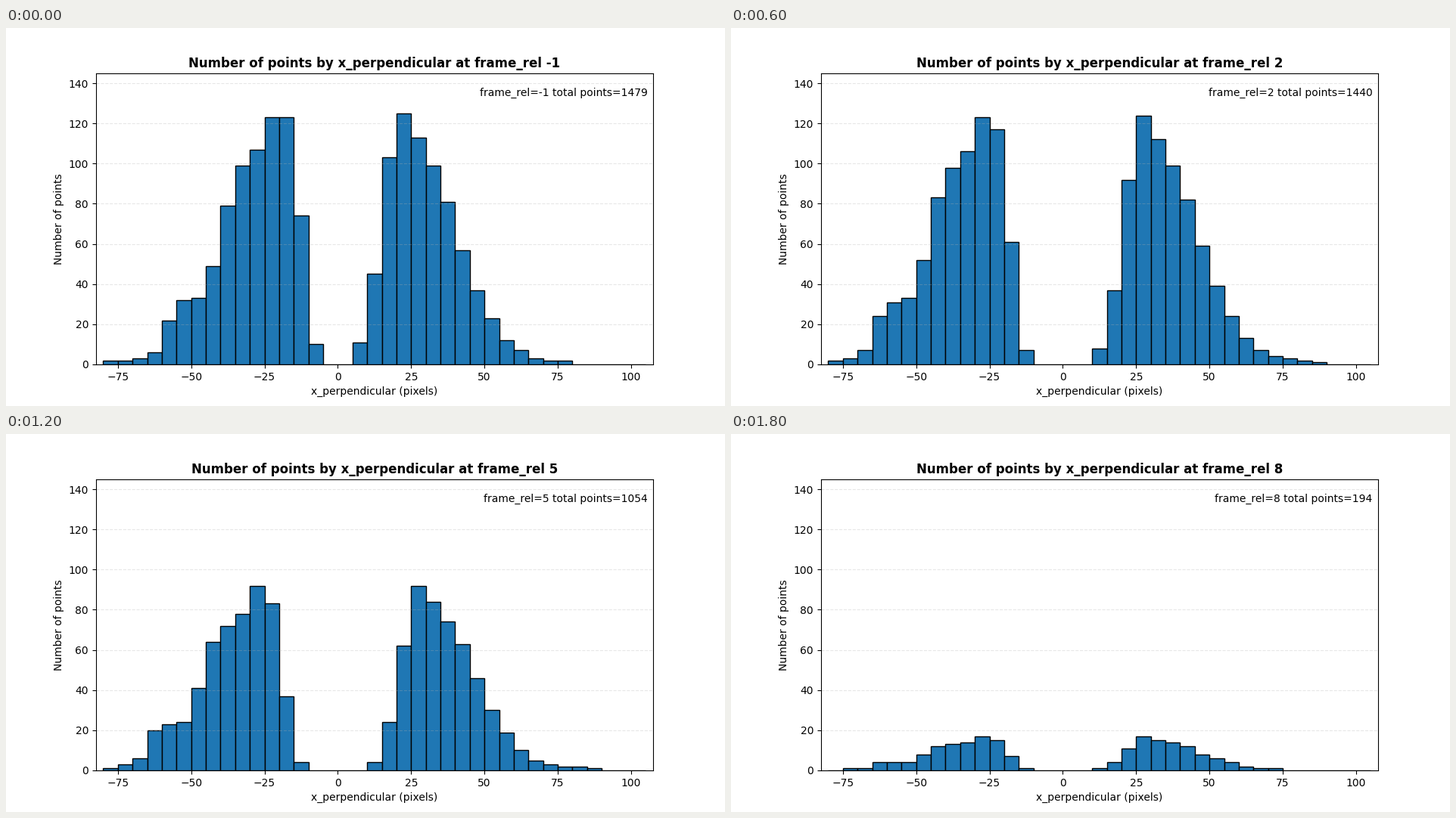
A matplotlib script for the animation above (2 s loop, 950x500 px).

```python
import matplotlib.pyplot as plt
import numpy as np
from matplotlib.animation import FuncAnimation

BIN = 5
EDGES = np.arange(-80, 105, BIN)
STEPS = range(-1, 9)

# Density per thousand points on each side, by distance from the gap's edge.
OFFSET = [-8, -4, 0, 4, 8, 13, 23, 28, 33, 43, 49, 56, 70]
LEFT = [0, 8, 47, 80, 90, 75, 64, 42, 23, 21, 5, 1.5, 1]
RIGHT = [0, 9, 28, 60, 88, 81, 62, 46, 30, 10, 5, 2, 1]

plt.rcParams["font.family"] = "DejaVu Sans"


def total_points(rel):
    """Nearly steady at first, then a steep decline."""
    return round(np.interp(rel, [-1, 0, 2, 4, 6, 7, 8],
                           [1479, 1491, 1440, 1322, 786, 462, 194]))


def gap_edge(rel):
    """The empty middle widens and settles."""
    return 18.8 - 3.3 * np.exp(-0.7 * rel)


def histogram(rel):
    center = EDGES + BIN / 2
    offset = abs(center) - gap_edge(rel)
    density = np.where(center < 0,
                       np.interp(offset, OFFSET, LEFT, right=0),
                       np.interp(offset, OFFSET, RIGHT, right=0))
    return np.round(density * total_points(rel) / 1000)


fig, ax = plt.subplots(figsize=(9.5, 5), dpi=100)
bars = ax.bar(EDGES, histogram(STEPS[0]), width=BIN, align="edge",
              color="#1f77b4", edgecolor="black")
ax.set_xlim(-82.5, 107.5)
ax.set_ylim(0, 144.9)
ax.set_xlabel("x_perpendicular (pixels)")
ax.set_ylabel("Number of points")
ax.grid(axis="y", linestyle="--", alpha=0.3)
title = ax.set_title("", fontweight="bold")
note = ax.text(0.99, 0.95, "", transform=ax.transAxes, ha="right", va="top")


def update(i):
    rel = STEPS[i]
    for bar, n in zip(bars, histogram(rel)):
        bar.set_height(n)
    title.set_text(f"Number of points by x_perpendicular at frame_rel {rel}")
    note.set_text(f"frame_rel={rel} total points={total_points(rel)}")
    return [*bars, title, note]


anim = FuncAnimation(fig, update, frames=len(STEPS), interval=200,
                     repeat=True, repeat_delay=0)
plt.show()
```
